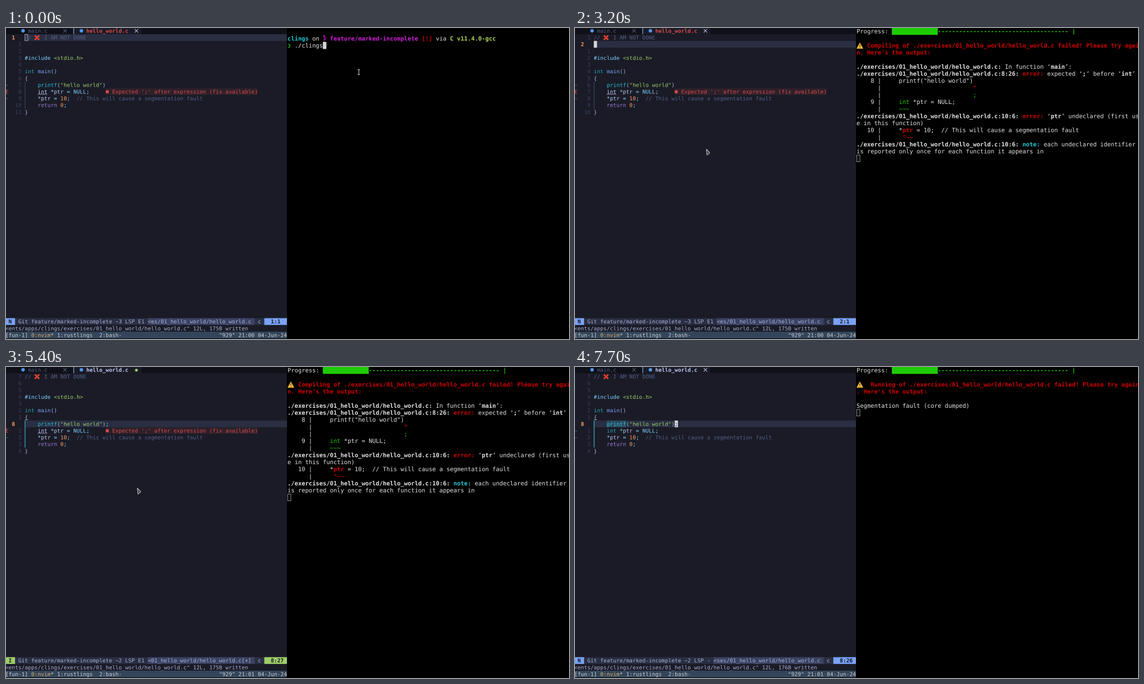
An HTML page with a canvas for the animation above (8 s loop, 1006 px wide and 557 px high).

```html
<!DOCTYPE html>
<html lang="en">
<head>
<meta charset="utf-8">
<title>Editor and terminal</title>
<style>
html, body { margin: 0; width: 100%; height: 100%; overflow: hidden; background: #000; }
canvas { display: block; width: 1006px; height: 557px; }
</style>
</head>
<body>
<canvas id="stage" width="2012" height="1114"></canvas>
<script>
// The canvas has twice the stage resolution, so that text can sit between whole pixels.
const ctx = document.getElementById('stage').getContext('2d');
ctx.scale(2, 2);
ctx.textRendering = 'geometricPrecision';

const LOOP = 8000;
const SPLIT = 502.1;
const EDIT = { x: -1.15, y: -1.05, w: 5.784, h: 12.11, size: 9.5, base: 9.55 };
const TERM = { x: 503.05, y: -0.3, w: 6.31, h: 12.64, size: 10.52, base: 10 };

const C = {
  bg: '#1a1b26', tabs: '#101118', line: '#292e42', seg: '#3b4261', num: '#3b4261', ref: '#2c4a5c',
  fg: '#c0caf5', dim: '#a9b1d6', comment: '#565f89', cyan: '#7dcfff', op: '#89ddff',
  type: '#27a1b9', call: '#2ac3de', blue: '#7aa2f7', green: '#9ece6a', orange: '#ff9e64',
  purple: '#9d7cd8', red: '#db4b4b', redBg: '#2d202a', sign: '#3f7791', ink: '#15161e',
  bar: '#33455a', barText: '#d0d3d6', yellow: '#e0af68', cursor: '#d6d6d6'
};
const T = { fg: '#e2e2e2', red: '#cd0000', green: '#1ecc05', magenta: '#d01fd6', cyan: '#1fc8d2', lime: '#afd75f' };

const FILE = './exercises/01_hello_world/hello_world.c';

function rect(x, y, w, h, color) {
  ctx.fillStyle = color;
  ctx.fillRect(x, y, w, h);
}

function cells(g, row, col, n, color) {
  rect(g.x + col * g.w, g.y + row * g.h, n * g.w, g.h, color);
}

// Writes runs of [text, colour, bold] one after the other on the character grid.
function put(g, row, col, ...runs) {
  const base = g.y + row * g.h + g.base;
  for (const [text, color, bold] of runs) {
    ctx.font = `${bold ? 'bold ' : ''}${g.size}px "DejaVu Sans Mono", monospace`;
    ctx.fillStyle = color;
    for (const ch of text) {
      if (ch !== ' ') ctx.fillText(ch, g.x + col * g.w, base);
      col++;
    }
  }
}

function stroke(points, color, width) {
  ctx.beginPath();
  points.forEach(([x, y], i) => i ? ctx.lineTo(x, y) : ctx.moveTo(x, y));
  ctx.strokeStyle = color;
  ctx.lineWidth = width;
  ctx.stroke();
}

function cross(x, y, r, color, width) {
  stroke([[x - r, y - r], [x + r, y + r]], color, width);
  stroke([[x - r, y + r], [x + r, y - r]], color, width);
}

function disc(x, y, r, color) {
  ctx.beginPath();
  ctx.arc(x, y, r, 0, Math.PI * 2);
  ctx.fillStyle = color;
  ctx.fill();
}

function polygon(points, fill) {
  ctx.beginPath();
  points.forEach(([x, y]) => ctx.lineTo(x, y));
  ctx.closePath();
  ctx.fillStyle = fill;
  ctx.fill();
}

function hollow(g, row, col, color) {
  const line = 0.7;
  ctx.strokeStyle = color;
  ctx.lineWidth = line;
  ctx.strokeRect(g.x + col * g.w + line / 2, g.y + row * g.h + line / 2, g.w - line, g.h - line);
}

function stateAt(t) {
  const from = (a, b = LOOP) => t >= a && t < b;
  const line = t < 3100 ? 1 : t < 3500 ? 2 : t < 3600 ? 4 : t < 3700 ? 6 : 8;
  const pos = t < 3200 ? '1:1' : t < 4200 ? line + ':1' : from(4800, 5800) ? '8:27' : '8:26';
  return {
    t, line, pos,
    insert: from(4200, 5800),
    focusLeft: t >= 2300,
    scope: t >= 3700,
    ref: from(4400, 4800) || t >= 6100,
    match: from(4200, 4800),
    typed: t >= 4800,
    modified: from(4800, 6400),
    staged: t >= 4900,
    error: t < 5900,
    saved: t >= 6400,
    clock: t < 4200 ? '21:00' : '21:01',
    cursorOn: !from(5400, 5800) && !from(7200, 7700)
  };
}

function drawTabs(s) {
  rect(0, 0, SPLIT, EDIT.y + EDIT.h, C.tabs);
  cells(EDIT, 0, 21, 21, C.bg);
  rect(120.3, 0, 1.4, EDIT.y + EDIT.h, '#5fa0dc');
  disc(30.5, 5, 3.2, '#4f97ec');
  put(EDIT, 0, 7, ['main.c', C.comment]);
  cross(105.5, 5, 3, C.comment, 0.9);
  disc(134.7, 5, 3.2, '#4f97ec');
  put(EDIT, 0, 25, ['hello_world.c', s.typed ? C.fg : C.red, true]);
  if (s.modified) disc(233, 5.7, 2.6, C.green);
  else cross(233, 5, 3, C.fg, 0.9);
}

function drawCode(s) {
  cells(EDIT, s.line, 6, 81, C.line);
  for (let row = 1; row <= 12; row++) {
    if (row === s.line) put(EDIT, row, 2, [String(row), C.orange, true]);
    else {
      const n = String(Math.abs(row - s.line));
      put(EDIT, row, 5 - n.length, [n, C.num]);
    }
  }
  if (!s.staged) put(EDIT, 8, 0, ['~', C.sign]);
  put(EDIT, 9, 0, s.error ? ['E', C.red] : ['~', C.sign]);
  put(EDIT, 10, 0, ['~', C.sign]);
  rect(EDIT.x + 6 * EDIT.w, EDIT.y + 8 * EDIT.h, 1.2, 4 * EDIT.h, s.scope ? '#3cb4cb' : C.seg);

  put(EDIT, 1, 6, ['//', C.comment]);
  cross(55.5, 17.3, 3.9, '#e0402f', 2.8);
  put(EDIT, 1, 12, ['I AM NOT DONE', C.comment]);
  put(EDIT, 4, 6, ['#include ', C.cyan], ['<stdio.h>', C.green]);
  put(EDIT, 6, 6, ['int ', C.type], ['main', C.blue], ['()', C.dim]);
  put(EDIT, 7, 6, ['{', C.dim]);
  if (s.scope) rect(33.6, 94.2, 5.8, 0.8, C.dim);

  if (s.ref) cells(EDIT, 8, 10, 6, C.ref);
  const paren = s.match ? C.orange : C.dim;
  put(EDIT, 8, 10, ['printf', C.call], ['(', paren, s.match], ['"hello world"', C.green],
    [')', paren, s.match], [s.typed ? ';' : '', C.op]);

  put(EDIT, 9, 10, ['int ', s.error ? C.fg : C.type], ['*', C.op], ['ptr ', C.fg], ['= ', C.op], ['NULL', C.cyan], [';', C.op]);
  if (s.error) {
    const wave = [];
    for (let x = 56.7; x <= 74; x += 0.5) wave.push([x, 118.6 + Math.sin((x - 56.7) * 1.6) * 0.8]);
    stroke(wave, C.dim, 0.7);
    cells(EDIT, 9, 31, 47, C.redBg);
    rect(178.3, 111.5, 5.2, 5.3, C.red);
    put(EDIT, 9, 33, ["Expected ';' after expression (fix available)", C.red]);
  }
  put(EDIT, 10, 10, ['*', C.op], ['ptr ', C.fg], ['= ', C.op], ['10', C.orange], [';  ', C.op],
    ['// This will cause a segmentation fault', C.comment]);
  put(EDIT, 11, 10, ['return ', C.purple], ['0', C.orange], [';', C.op]);
  put(EDIT, 12, 6, ['}', C.dim]);
}

function drawEditCursor(s) {
  if (!s.focusLeft) return hollow(EDIT, 1, 6, C.cursor);
  if (!s.cursorOn) return;
  if (s.insert) {
    const col = s.typed ? 32 : 31;
    return rect(EDIT.x + col * EDIT.w, EDIT.y + 8 * EDIT.h, 1, EDIT.h, C.cursor);
  }
  const col = s.t >= 5800 ? 31 : 6;
  const under = { 1: '/', 4: '#', 6: 'i' }[s.line] || (col === 31 ? ';' : ' ');
  cells(EDIT, s.line, col, 1, C.cursor);
  put(EDIT, s.line, col, [under, C.bg]);
}

function drawStatus(s) {
  const accent = s.insert ? C.green : C.blue;
  const git = `Git feature/marked-incomplete ~${s.staged ? 2 : 3} LSP ${s.error ? 'E1' : '-'}`;
  const start = 5 + git.length;
  const path = 'exercises/01_hello_world/hello_world.c' + (s.modified ? '[+]' : '');
  cells(EDIT, 43, 0, 87, C.line);
  cells(EDIT, 43, 0, 3, accent);
  cells(EDIT, 43, start, 77 - start, C.seg);
  cells(EDIT, 43, 80, 7, accent);
  put(EDIT, 43, 1, [s.insert ? 'I' : 'N', C.ink, true]);
  put(EDIT, 43, 4, [git, C.dim]);
  put(EDIT, 43, start, ['<' + path.slice(start - 75), C.dim]);
  put(EDIT, 43, 78, ['c', C.dim]);
  put(EDIT, 43, 82, [s.pos, C.ink, true]);
  put(EDIT, 44, 0, [`<ents/apps/clings/exercises/01_hello_world/hello_world.c" 12L, ${s.saved ? 176 : 175}B written`, C.dim]);

  cells(EDIT, 45, 0, 87, C.bar);
  put(EDIT, 45, 0, ['[fun-1] ', C.barText], ['0:nvim', C.yellow], ['* 1:rustlings  2:bash-', C.barText]);
  put(EDIT, 45, 66, [`"929" ${s.clock} 04-Jun-24`, C.barText]);
}

function drawPrompt(t) {
  put(TERM, 1, 0, ['clings', T.cyan, true], [' on ', T.fg]);
  stroke([[568.5, 13], [568.5, 24.5]], T.magenta, 1.1);
  stroke([[567, 15], [568.5, 13], [570, 15]], T.magenta, 0.9);
  stroke([[568.5, 21.5], [571.5, 19], [571.5, 16]], T.magenta, 1.1);
  put(TERM, 1, 12, ['feature/marked-incomplete ', T.magenta, true], ['[!]', T.red, true], [' via ', T.fg], ['C v11.4.0-gcc', T.lime, true]);
  put(TERM, 2, 0, ['❯ ', T.green, true], ['./clings', T.fg]);
  if (t < 500) cells(TERM, 2, 10, 1, C.cursor);
  if (t >= 700 && t < 1200) cells(TERM, 3, 0, 1, C.cursor);
}

function drawProgress() {
  put(TERM, 0, 0, ['Progress:', T.fg]);
  cells(TERM, 0, 10, 13, T.green);
  put(TERM, 0, 23, ['-'.repeat(37) + ' |', T.green, true]);
}

function drawFailure(col, head, tail) {
  polygon([[509, 26], [515, 37], [503, 37]], '#f9b934');
  rect(508.4, 29.5, 1.2, 4, '#3b3328');
  rect(508.4, 34.5, 1.2, 1.2, '#3b3328');
  put(TERM, 2, col, [head, T.red, true]);
  put(TERM, 3, 0, [tail, T.red, true]);
}

function drawCompile(focused) {
  const at = (row, place, label, color, ...rest) =>
    put(TERM, row, 0, [FILE + place, T.fg, true], [' ' + label, color, true], ...rest);
  const gutter = (row, n, ...rest) => put(TERM, row, 0, [n.padStart(5) + ' |     ', T.fg], ...rest);

  drawFailure(3, `Compiling of ${FILE} failed! Please try agai`, "n. Here's the output:");
  at(5, ':', '', T.fg, ['In function ‘', T.fg], ['main', T.fg, true], ['’:', T.fg]);
  at(6, ':8:26:', 'error:', T.red, [' expected ‘', T.fg], [';', T.fg, true], ['’ before ‘', T.fg], ['int', T.fg, true], ['’', T.fg]);
  gutter(7, '8', ['printf("hello world")', T.fg]);
  gutter(8, '', [' '.repeat(21) + '^', T.red, true]);
  gutter(9, '', [' '.repeat(21) + ';', T.green]);
  gutter(10, '9', ['int', T.green], [' *ptr = NULL;', T.fg]);
  gutter(11, '', ['~~~', T.green]);
  at(12, ':10:6:', 'error:', T.red, [' ‘', T.fg], ['ptr', T.fg, true], ['’ undeclared (first us', T.fg]);
  put(TERM, 13, 0, ['e in this function)', T.fg]);
  gutter(14, '10', ['*', T.fg], ['ptr', T.red, true], [' = 10;  // This will cause a segmentation fault', T.fg]);
  gutter(15, '', [' ^~~', T.red, true]);
  at(16, ':10:6:', 'note:', T.cyan, [' each undeclared identifier', T.fg]);
  put(TERM, 17, 0, ['is reported only once for each function it appears in', T.fg]);
  if (focused) cells(TERM, 18, 0, 1, C.cursor);
  else hollow(TERM, 18, 0, C.cursor);
}

function drawTerminal(s) {
  if (s.t < 1700) return drawPrompt(s.t);
  drawProgress();
  if (s.t < 6600) return drawCompile(!s.focusLeft);
  if (s.t >= 6700) drawFailure(4, `Running of ${FILE} failed! Please try again`, ". Here's the output:");
  if (s.t >= 6800) put(TERM, 5, 0, ['Segmentation fault (core dumped)', T.fg]);
  hollow(TERM, s.t >= 6800 ? 6 : s.t >= 6700 ? 5 : 2, 0, C.cursor);
}

function drawMouse(t) {
  if (t >= 5500) return;
  if (t < 2300) {
    const x = t < 2000 ? 630.5 : t < 2200 ? 629.5 : 570.5;
    const y = t < 2200 ? 79 : 98;
    for (const [color, w] of [['#000', 2.6], ['#dcdcdc', 1]]) {
      stroke([[x - 2, y - 4.5], [x + 2, y - 4.5]], color, w);
      stroke([[x, y - 4.5], [x, y + 4.5]], color, w);
      stroke([[x - 2, y + 4.5], [x + 2, y + 4.5]], color, w);
    }
    return;
  }
  const [x, y] = t < 2400 ? [430, 148] : t < 2500 ? [295, 198] : [234.7, 217];
  const arrow = [[0, 0], [5.8, 6], [4.6, 8.2], [1.2, 10.4], [0, 0]].map(([a, b]) => [x + a, y + b]);
  polygon(arrow, '#3c3c42');
  stroke(arrow, '#dcdcdc', 0.9);
}

function frame(now) {
  const s = stateAt(now % LOOP);
  rect(0, 0, 1006, 557, '#000');
  rect(0, 0, SPLIT, 556, C.bg);
  drawTabs(s);
  drawCode(s);
  drawEditCursor(s);
  drawStatus(s);
  rect(SPLIT, 0, 1006 - SPLIT, 557, '#000');
  drawTerminal(s);
  drawMouse(s.t);
  requestAnimationFrame(frame);
}
requestAnimationFrame(frame);
</script>
</body>
</html>
```
